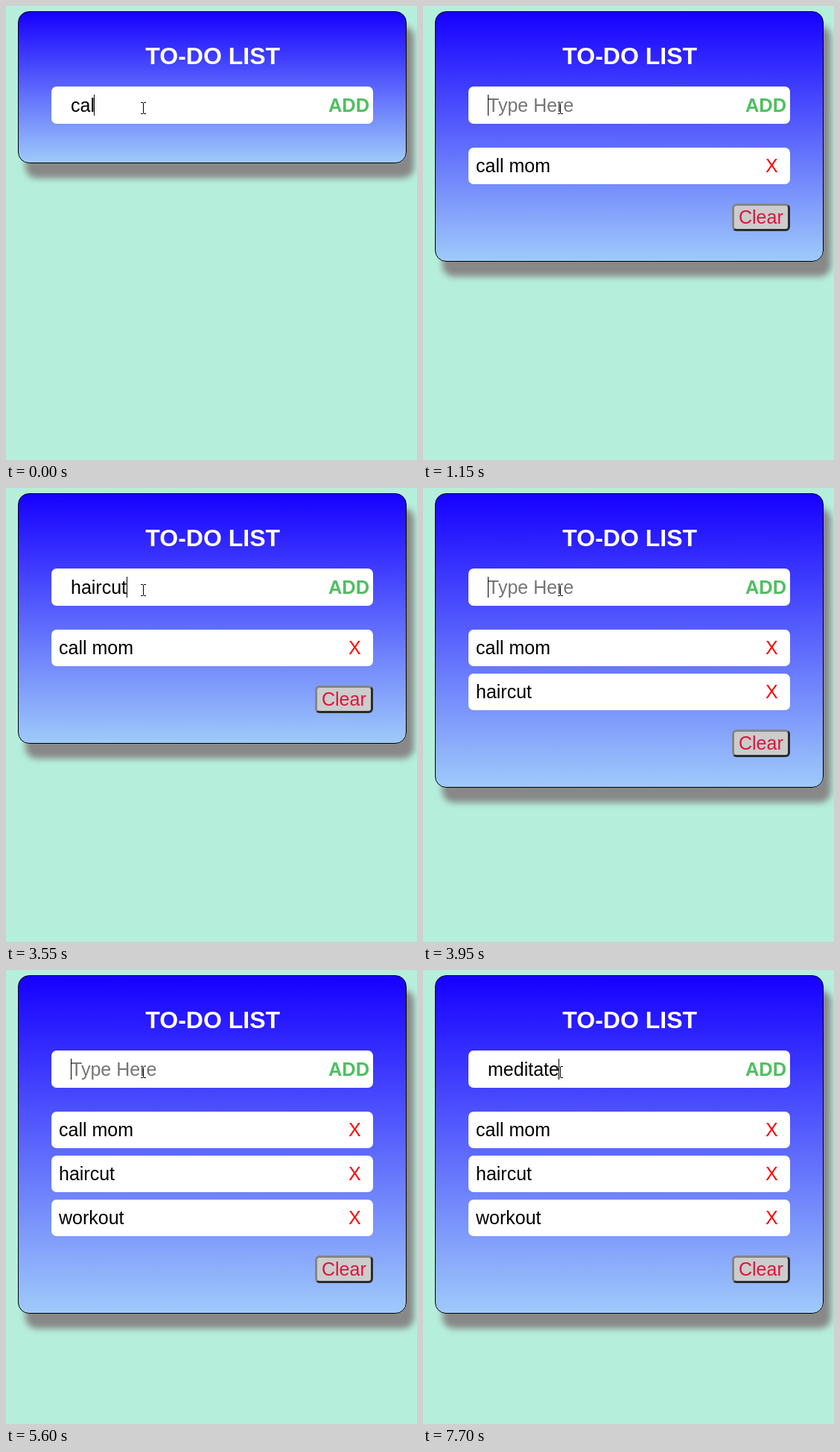
An HTML page that plays this animation: 552x609 px, repeating every 8 s.

```html
<!DOCTYPE html>
<html lang="en">
<head>
<meta charset="utf-8">
<title>To-do list</title>
<style>
  html, body { margin: 0; width: 100%; height: 100%; overflow: hidden; }
  body { position: relative; background: #b6eedc; font: 25px/28px "Liberation Sans", Arial, sans-serif; color: #000; }
  div { position: absolute; box-sizing: border-box; white-space: pre; }
  #card {
    left: 16px; top: 7px; width: 522px; border: 1px solid #000; border-radius: 15px;
    background: linear-gradient(#1600ff, #9fcafa); box-shadow: 10px 20px 8px #888;
  }
  #title { left: 187.3px; top: 49px; font: bold 32px/36px "Liberation Sans", Arial, sans-serif; color: #fff; }
  .field { left: 61px; width: 432px; height: 49px; border-radius: 7px; background: #fff; }
  #entry { top: 108px; height: 50px; }
  #typed { left: 26px; top: 11px; }
  #caret { top: 11px; width: 1px; height: 28px; background: #000; }
  #add { right: 5px; top: 11px; font-weight: bold; font-size: 25.4px; color: #4fbf5f; }
  .task { left: 10px; top: 10px; }
  .remove { left: 399px; top: 10px; color: #f00; }
  #clear {
    left: 415px; width: 78px; height: 37px; padding: 1px 6px; color: #dc143c; background: #ccc;
    border: 3px solid; border-color: #858585 #2b2b2b #2b2b2b #858585; border-radius: 6px;
  }
  #pointer { left: 181px; top: 129px; width: 7px; height: 16px; mix-blend-mode: difference; }
  #pointer path { fill: #fff; }
  #pointer svg { display: block; }
</style>
</head>
<body>
<div id="card"></div>
<div id="title">TO-DO LIST</div>
<div id="entry" class="field"><div id="typed"></div><div id="caret"></div><div id="add">ADD</div></div>
<div id="clear">Clear</div>
<div id="pointer"><svg width="7" height="16" shape-rendering="crispEdges"><path d="M0 0h3v1h-3zM4 0h3v1h-3zM3 1h1v14h-1zM0 15h3v1h-3zM4 15h3v1h-3z"/></svg></div>
<script>
const LOOP = 8000;
// One key time per letter; each round starts when the previous task is added.
const rounds = [
  { start: 0, word: 'call mom', keys: [0, 0, 0, 150, 400, 500, 650, 800] },
  { start: 1150, word: 'haircut', keys: [1950, 2300, 2800, 2900, 3300, 3400, 3550] },
  { start: 3950, word: 'workout', keys: [4500, 4600, 4750, 4850, 5000, 5100, 5200] },
  { start: 5600, word: 'meditate', keys: [6200, 6350, 6800, 6900, 7050, 7200, 7300, 7700] }
];
const byId = id => document.getElementById(id);
const card = byId('card'), typed = byId('typed'), caret = byId('caret'), clear = byId('clear');

const rows = rounds.slice(0, -1).map(({ word }, i) => {
  const row = document.createElement('div');
  row.className = 'field';
  row.style.top = 190 + 59 * i + 'px';
  row.innerHTML = `<div class="task">${word}</div><div class="remove">X</div>`;
  document.body.insertBefore(row, clear);
  return row;
});

function draw(t) {
  const count = rounds.filter(r => r.start <= t).length - 1;
  const { start, word, keys } = rounds[count];
  const text = word.slice(0, keys.filter(k => k <= t).length);
  const idle = t - start;

  typed.textContent = text || 'Type Here';
  typed.style.color = text ? '#000' : '#757575';
  const width = text ? Math.floor(typed.getBoundingClientRect().width) : 0;
  caret.style.left = 26 + width + 'px';
  caret.hidden = !text && idle >= 150 && idle < 700;

  rows.forEach((row, i) => row.hidden = i >= count);
  clear.hidden = !count;
  clear.style.top = 206 + 59 * count + 'px';
  card.style.height = 204 + (count && 73 + 59 * count) + 'px';
}

const begin = performance.now();
function tick() {
  draw((performance.now() - begin) % LOOP);
  requestAnimationFrame(tick);
}
tick();
</script>
</body>
</html>
```
